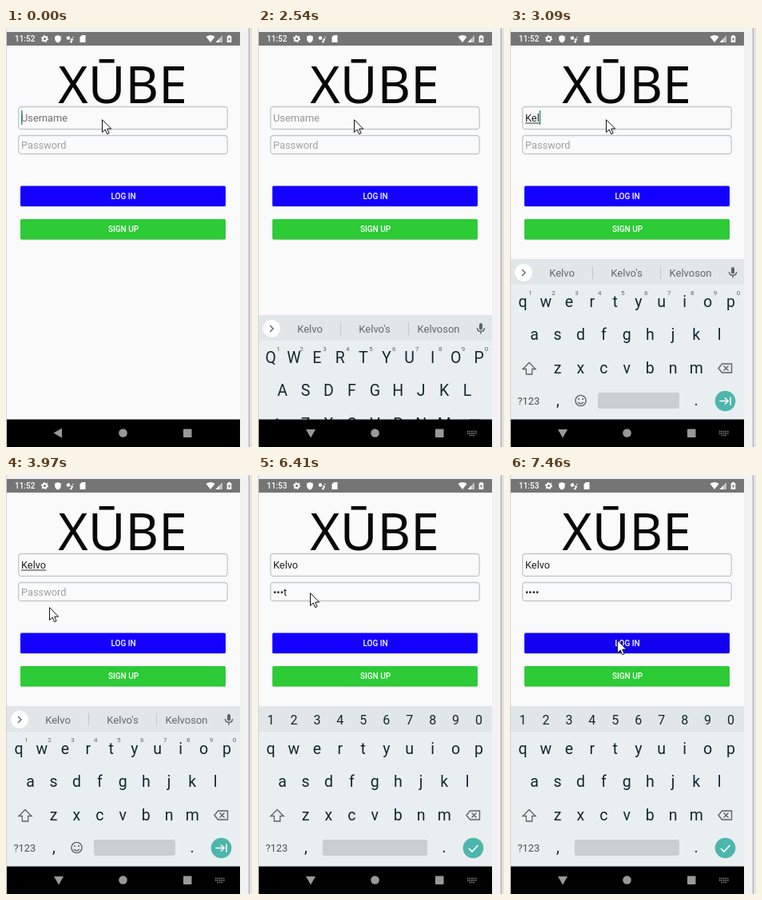
An HTML page for the animation above (8 s loop, 308 px wide and 524 px high).

```html
<!DOCTYPE html>
<html lang="en">
<head>
<meta charset="utf-8">
<title>Login screen</title>
<style>
html, body { margin: 0; width: 100%; height: 100%; overflow: hidden; background: #f0f0f0; }
svg { display: block; width: 308px; height: 524px; font-family: Roboto, sans-serif; }
.mid { text-anchor: middle; }
.field { fill: #fafafa; stroke: #c3c7cb; stroke-width: 1.3; }
.entry { font-size: 12.8px; fill: #222; }
.btn { font-size: 10px; font-weight: 500; fill: #fff; text-anchor: middle; }
.key { font-size: 19.5px; fill: #12282f; text-anchor: middle; }
.digit { font-size: 16px; fill: #12282f; text-anchor: middle; }
.sup { font-size: 8px; fill: #5b666b; text-anchor: middle; }
.word { font-size: 13px; fill: #5f6a70; text-anchor: middle; }
.line { fill: none; stroke: #59656b; stroke-width: 1.4; }
</style>
</head>
<body>
<svg viewBox="0 0 308 524">
  <!-- window edges -->
  <rect width="308" height="524" fill="#f2f2f2"/>
  <rect width="1" height="524" fill="#d2d2d2"/>
  <rect x="303" width="5" height="524" fill="#e2e2e2"/>
  <rect x="304" width="1" height="524" fill="#aaa"/>
  <rect x="1" y="5" width="292" height="485" fill="#fafafa"/>

  <!-- status bar -->
  <rect x="1" y="5" width="292" height="17" fill="#757575"/>
  <g fill="#fff">
    <text id="clock" x="11" y="17" font-size="10" font-weight="500"></text>
    <circle cx="48.5" cy="13.5" r="2.6" fill="none" stroke="#fff" stroke-width="2"/>
    <circle cx="48.5" cy="13.5" r="4" fill="none" stroke="#fff" stroke-width="1.4" stroke-dasharray="1.6 2.59"/>
    <path d="M65 9l3.8 1.5v3q0 3.5-3.8 5-3.8-1.5-3.8-5v-3z"/>
    <circle cx="78" cy="12.5" r="2.3"/><circle cx="82.5" cy="14.5" r="1.5"/>
    <circle cx="81.5" cy="17.3" r="1.2"/><circle cx="84" cy="11.5" r=".8"/>
    <path d="M95 9h4.5v9h-7v-6.5z"/>
    <path d="M250.5 11q5.5-4 11 0l-5.5 7z"/>
    <path d="M271 9v9h-8.5z" opacity=".55"/><path d="M267 13.5v4.5h-4.5z"/>
    <path d="M278 9h3v1h1.3v8h-5.6v-8h1.3z"/>
    <path d="M279.8 11.3l-2 3.2h1.5v2.3l2-3.3h-1.5z" fill="#757575"/>
  </g>

  <!-- form -->
  <text class="mid" x="146" y="93.5" font-size="64" font-family="Noto Sans, sans-serif" fill="#080808">XŪBE</text>
  <rect class="field" x="15.7" y="98.5" width="261.5" height="28" rx="3.5"/>
  <rect class="field" x="15.7" y="134.5" width="261.5" height="23" rx="3.5"/>
  <text id="user" class="entry" x="19" y="117"></text>
  <rect id="under" x="19" y="118.5" height="1" fill="#333"/>
  <text id="pass" class="entry" x="19" y="151"></text>
  <rect id="caret" width="1.5" height="18" fill="#2f8f86"/>
  <g id="buttons">
    <rect x="18.5" y="199" width="256" height="25" rx="2" fill="#dedede"/>
    <rect id="login" x="18" y="197.5" width="257" height="25.5" rx="1.5" fill="#1400ff"/>
    <circle id="ripple" cx="136" cy="210" r="12.5" fill="#3a2aff"/>
    <text class="btn" x="147" y="214">LOG IN</text>
    <rect x="18.5" y="240" width="256" height="25.5" rx="2" fill="#dedede"/>
    <rect x="18" y="239" width="257" height="25.5" rx="1.5" fill="#2dcb36"/>
    <text class="btn" x="147" y="255">SIGN UP</text>
  </g>

  <!-- keyboard -->
  <g id="board">
    <rect x="1" y="289" width="292" height="201" fill="#e9eef1"/>
    <rect x="1" y="289" width="292" height="32" fill="#e1e6e9"/>
    <g id="words">
      <circle cx="17" cy="306.5" r="11" fill="#d0d5d8"/>
      <circle cx="17" cy="306" r="11" fill="#fff"/>
      <path class="line" d="M15 302l4 4-4 4"/>
      <path d="M103.5 298v16M188.5 298v16" stroke="#c3cacd"/>
      <text class="word" x="65" y="311">Kelvo</text>
      <text class="word" x="146" y="311">Kelvo's</text>
      <text class="word" x="226" y="311">Kelvoson</text>
      <rect x="277" y="299" width="4" height="8.5" rx="2" fill="#59656b"/>
      <path class="line" d="M274.5 305q0 4.5 4.5 4.5t4.5-4.5M279 309.5v3"/>
    </g>
    <g id="digits"></g>
    <g id="keys"></g>
    <path id="shift" d="M24 418.5l8 8h-4.3v6.5h-7.4v-6.5h-4.3z" stroke="#59656b" stroke-width="1.3"/>
    <path class="line" d="M265.5 420h12v11h-12l-4.5-5.5zM267.5 422.5l6 6M273.5 422.5l-6 6"/>
    <text x="9.5" y="470.5" font-size="12.8" fill="#455157">?123</text>
    <text class="key" x="60" y="472">,</text>
    <g id="smile">
      <circle class="line" cx="88.5" cy="466" r="6.6"/>
      <circle cx="86" cy="464" r="1.1" fill="#59656b"/><circle cx="91" cy="464" r="1.1" fill="#59656b"/>
      <path class="line" d="M85 468q3.5 3.5 7 0"/>
    </g>
    <rect id="space" y="456" height="20" rx="2" fill="#c9ced1"/>
    <text class="key" x="233" y="472">.</text>
    <circle cx="269.5" cy="466.5" r="12.8" fill="#4db6ac"/>
    <path id="enter" fill="none" stroke="#fff" stroke-width="1.7"/>
  </g>

  <!-- navigation bar -->
  <rect x="1" y="489.5" width="292" height="34.5" fill="#000"/>
  <g fill="#999">
    <path id="back"/>
    <circle cx="146.5" cy="506.5" r="5.3"/>
    <rect x="222" y="501.5" width="10.5" height="10.5" rx=".8"/>
    <path id="navKeys" d="M262 504.5h12M262 507h12M264.5 509.5h7" stroke="#8a8a8a" stroke-width="1.5" stroke-dasharray="1.5 1"/>
  </g>

  <path id="mouse" d="M.5.7v15.8l3.7-3.5 2.4 5.6 2.5-1-2.4-5.5h5z" fill="#fff" stroke="#111" stroke-linejoin="round"/>
</svg>
<script>
const $ = id => document.getElementById(id);
const LOOP = 8000;
const NAME = "Kelvo";

// Each table row: start time, then the value held until the next row.
const mouse = [[0, 120, 114], [3670, 107, 123], [3820, 70, 157], [3970, 54, 165],
  [4090, 56, 159], [4220, 58, 149], [4340, 59, 142], [4490, 59, 147], [6410, 65, 147],
  [6550, 95, 165], [6670, 122, 186], [6790, 135, 195], [6940, 135, 201], [7060, 134, 206]];
const typed = [[0, 0], [2780, 1], [3090, 3], [3240, 5]];
const secret = [[0, ""], [5200, "t"], [5480, "•e"], [5730, "••s"], [5850, "•••"],
  [6280, "•••t"], [6550, "••••"]];
const caret = [[0, "user"], [430, ""], [870, "user"], [1420, ""], [2780, "user"], [3670, ""],
  [4220, "user"], [4340, "pass"], [4900, ""], [5200, "pass"], [6410, ""], [6550, "pass"], [7340, ""]];
const rise = [[0, 200], [2540, 70], [2660, 0]];

const at = (table, t) => table.findLast(row => row[0] <= t).slice(1);
const show = (id, on) => $(id).setAttribute("visibility", on ? "visible" : "hidden");
const set = (id, attrs) => {
  for (const [name, value] of Object.entries(attrs)) $(id).setAttribute(name, value);
};

function label(parent, text, cls, x, y) {
  const node = document.createElementNS("http://www.w3.org/2000/svg", "text");
  node.setAttribute("class", cls);
  node.setAttribute("x", x);
  node.setAttribute("y", y);
  node.textContent = text;
  $(parent).append(node);
  return node;
}

const letters = [["qwertyuiop", 16, 349], ["asdfghjkl", 30.5, 390], ["zxcvbnm", 59.5, 432]]
  .flatMap(([row, x, y]) => [...row].map((c, i) => label("keys", c, "key", x + i * 28.95, y)));
const sups = [..."1234567890"].map((d, i) => {
  label("digits", d, "digit", 16 + i * 28.95, 312);
  return label("keys", d, "sup", 25.5 + i * 28.95, 333.5);
});

function entry(id, text, hint, hintColor) {
  const node = $(id);
  const value = text || hint;
  if (node.textContent !== value) node.textContent = value;
  node.style.fill = text ? "#222" : hintColor;
  return text ? node.getComputedTextLength() : 0;
}

function draw(t) {
  const [mx, my] = at(mouse, t);
  set("mouse", { transform: `translate(${mx} ${my})` });
  $("clock").textContent = t < 6410 ? "11:52" : "11:53";

  const name = NAME.slice(0, at(typed, t)[0]);
  const widths = {
    user: entry("user", name, "Username", t < 280 ? "#707070" : "#959595"),
    pass: entry("pass", at(secret, t)[0], "Password", "#a0a0a0")
  };
  set("under", { width: t < 4340 ? widths.user : 0 });

  const [focus] = at(caret, t);
  show("caret", focus);
  if (focus) set("caret", { x: 19 + widths[focus], y: focus === "user" ? 103 : 137 });

  const open = t >= 2540, caps = t < 2780, digits = t >= 4490;
  show("board", open);
  set("board", { transform: `translate(0 ${at(rise, t)[0]})` });
  for (const key of letters) {
    const c = key.textContent;
    key.textContent = caps ? c.toUpperCase() : c.toLowerCase();
  }
  for (const sup of sups) sup.style.display = digits ? "none" : "";
  $("words").style.display = $("smile").style.display = digits ? "none" : "";
  $("digits").style.display = digits ? "" : "none";
  set("shift", { fill: caps ? "#59656b" : "none" });
  set("space", { x: digits ? 81 : 110, width: digits ? 131 : 102 });
  set("enter", { d: digits ? "M264 467l4 4 7.5-8" : "M262.5 466.5h10M269 462.5l4 4-4 4M276 461.5v10" });
  set("back", { d: open ? "M60 502h12l-6 10.5z" : "M70 500.5v12l-10.5-6z" });
  show("navKeys", open);

  show("ripple", t >= 7340 && t < 7460);
  set("login", { fill: t < 7460 ? "#1400ff" : "#1300f0" });
}

function tick() {
  draw(performance.now() % LOOP);
  requestAnimationFrame(tick);
}
tick();
</script>
</body>
</html>
```
